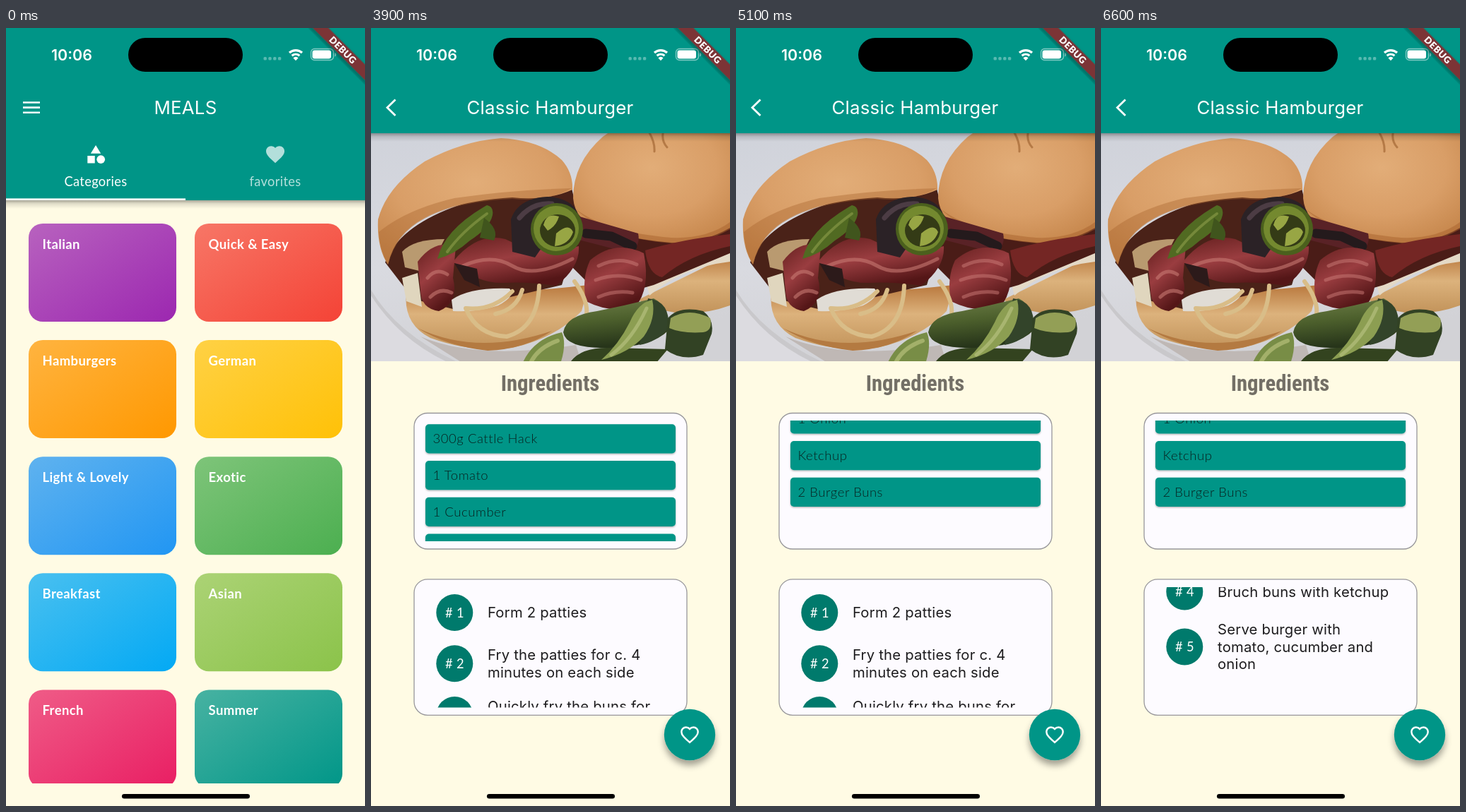
Recreate the animation shown at these times as an HTML page. Size 508x1102 px, loop 8 s.

```html
<!DOCTYPE html>
<html lang="en">
<head>
<meta charset="utf-8">
<title>Meals app</title>
<style>
html, body { margin: 0; width: 100%; height: 100%; overflow: hidden; background: #fffbe4; }
svg { display: block; width: 508px; height: 1102px; }
text { white-space: pre; }
.body { font: 400 18.3px Lato, sans-serif; letter-spacing: .35px; }
.item { font: 300 18.5px Lato, sans-serif; letter-spacing: .55px; }
.label { font: 700 18.5px Lato, sans-serif; letter-spacing: .4px; fill: #fff; }
.big { font: 400 31.5px Lato, sans-serif; letter-spacing: .75px; fill: #fff; }
.title { font: 400 25.8px Inter, sans-serif; letter-spacing: .22px; fill: #fff; }
.step { font: 400 20.3px Inter, sans-serif; letter-spacing: .2px; fill: #1d1c1e; }
.head { font: 700 30.7px "Roboto Condensed", Roboto, sans-serif; font-stretch: condensed; }
.clock { font: 600 21.5px Inter, sans-serif; fill: #fff; }
.debug { font: 900 13.2px Lato, sans-serif; letter-spacing: .5px; fill: #fff; }
.mid { text-anchor: middle; }
.line { fill: none; stroke-linecap: round; stroke-linejoin: round; }
</style>
</head>
<body>
<svg viewBox="0 0 508 1102">
  <defs>
    <linearGradient id="shade" x2="0" y2="1">
      <stop stop-color="#000" stop-opacity=".34"/>
      <stop offset=".4" stop-color="#000" stop-opacity=".12"/>
      <stop offset="1" stop-color="#000" stop-opacity="0"/>
    </linearGradient>
    <linearGradient id="edge">
      <stop stop-color="#000" stop-opacity="0"/>
      <stop offset="1" stop-color="#000" stop-opacity=".1"/>
    </linearGradient>
    <linearGradient id="wall" x2=".3" y2="1">
      <stop stop-color="#cfd2da"/><stop offset=".55" stop-color="#d9dae0"/><stop offset="1" stop-color="#d2d2d6"/>
    </linearGradient>
    <radialGradient id="bun" cx=".5" cy=".35" r=".75">
      <stop stop-color="#e2ad78"/><stop offset=".55" stop-color="#d99e67"/><stop offset="1" stop-color="#c48449"/>
    </radialGradient>
    <linearGradient id="crumb" x2="0" y2="1">
      <stop stop-color="#b9783d"/><stop offset=".45" stop-color="#dcb27c"/><stop offset="1" stop-color="#c2935a"/>
    </linearGradient>
    <linearGradient id="meat" x2=".5" y2="1">
      <stop stop-color="#65201f"/><stop offset=".5" stop-color="#9a3d40"/><stop offset="1" stop-color="#541617"/>
    </linearGradient>
    <linearGradient id="pickle" x2=".2" y2="1">
      <stop stop-color="#6f8048"/><stop offset=".5" stop-color="#4c5f2c"/><stop offset="1" stop-color="#27351a"/>
    </linearGradient>
    <filter id="soft" x="-30%" y="-30%" width="160%" height="160%">
      <feDropShadow dx="0" dy="3" stdDeviation="3" flood-opacity=".36"/>
    </filter>
    <filter id="lift" x="-50%" y="-50%" width="200%" height="200%">
      <feDropShadow dx="0" dy="7" stdDeviation="5" flood-opacity=".36"/>
    </filter>
    <filter id="thin" x="-5%" y="-20%" width="110%" height="150%">
      <feDropShadow dx="0" dy="1.2" stdDeviation=".9" flood-opacity=".32"/>
    </filter>
    <clipPath id="gridClip"><rect y="244" width="508" height="826"/></clipPath>
    <clipPath id="cardClip"><path d="M13 485V181a19 19 0 0 1 19-19H476a19 19 0 0 1 19 19V485z"/></clipPath>
    <clipPath id="photoClip"><rect y="149" width="508" height="323"/></clipPath>
    <clipPath id="itemClip"><rect x="70" y="556" width="368" height="171"/></clipPath>
    <clipPath id="stepClip"><rect x="70" y="792" width="368" height="170.5"/></clipPath>
    <path id="heart" d="M12 21.35l-1.45-1.32C5.4 15.36 2 12.28 2 8.5 2 5.42 4.42 3 7.5 3c1.74 0 3.41.81 4.5 2.09C13.09 3.81 14.76 3 16.5 3 19.58 3 22 5.42 22 8.5c0 3.78-3.4 6.86-8.55 11.54z"/>

    <!-- 3:2 picture, 8px taller at each end than the wide view shows -->
    <g id="photo">
      <rect y="-9" width="508" height="341" fill="url(#wall)"/>
      <path d="M0 222Q40 290 140 332H0z" fill="#c9c8cb"/>
      <path d="M0 230Q45 300 126 332H0z" fill="#dcdbe0"/>
      <path d="M70 288Q150 322 290 300L300 332H140z" fill="#bfb8b5"/>
      <!-- lower buns -->
      <path d="M50 225Q45 270 84 290 146 312 200 304 262 290 298 252L308 215Q180 230 50 225z" fill="url(#crumb)"/>
      <path d="M66 276Q150 316 256 280 218 306 165 308 108 302 66 276z" fill="#b47a41"/>
      <path d="M378 236L508 172V244Q470 258 430 254 400 250 378 236z" fill="url(#crumb)"/>
      <path d="M390 214L508 166V182Q440 190 394 230z" fill="#e4d9c6"/>
      <!-- inside -->
      <path d="M20 183Q40 130 130 100T284 78L296 130 270 215 120 250 60 235z" fill="#4a2218"/>
      <path d="M290 100L400 140 508 134V170L400 215 330 235 285 190z" fill="#4a1c17"/>
      <path d="M44 168Q60 150 104 150L80 198 48 190z" fill="#b99a70"/>
      <path d="M44 205L66 198 72 246 50 238z" fill="#e0d6be"/>
      <!-- top buns -->
      <path d="M24 186Q8 162 10 122 22 76 76 40 130 11 184 7 240 10 270 38 286 56 285 80 250 96 200 91 120 96 76 120 34 142 24 186z" fill="url(#bun)"/>
      <path d="M11 140Q50 108 118 92 200 80 284 78 250 98 200 93 120 97 76 121 36 142 24 186 12 165 11 140z" fill="#a9652f" opacity=".4"/>
      <path d="M286 92Q286 42 328 5L348 -9H508V134Q470 156 425 155 340 148 300 122 288 112 286 92z" fill="url(#bun)"/>
      <path d="M392 -4Q402 12 401 26M414 -4Q410 10 419 20" class="line" stroke="#b57a46" stroke-width="3"/>
      <path d="M288 106Q330 140 425 148 475 150 508 126V136Q470 158 425 156 330 148 288 106z" fill="#a9652f" opacity=".5"/>
      <!-- bacon -->
      <path d="M66 182Q90 150 120 160L116 205Q125 240 96 252 70 248 70 222z" fill="url(#meat)"/>
      <path d="M116 182Q150 140 190 150 240 175 294 160 296 190 262 216 220 210 190 212 150 214 116 182z" fill="url(#meat)"/>
      <path d="M130 188Q170 170 200 188T285 178M80 205Q92 190 108 200M84 232Q98 218 114 226" class="line" stroke="#c67872" stroke-width="5" opacity=".6"/>
      <path d="M198 122Q208 92 250 90 282 92 292 112L250 150 232 176 200 168z" fill="#2b2226"/>
      <path d="M210 120Q228 98 256 100" class="line" stroke="#4c3c44" stroke-width="7"/>
      <path d="M288 116Q330 128 378 142 382 160 366 170 330 160 290 150z" fill="#592226"/>
      <path d="M304 142L340 146 370 160" class="line" stroke="#241a1c" stroke-width="13"/>
      <path d="M310 180Q345 150 386 170 396 220 374 246 340 256 304 238 298 205 310 180z" fill="url(#meat)"/>
      <path d="M322 188Q350 174 376 186M318 208Q350 196 382 208M322 232Q345 222 370 226" class="line" stroke="#cb7c78" stroke-width="5" opacity=".5"/>
      <path d="M388 166Q440 150 508 143V160Q450 172 412 204 392 200 388 166z" fill="#742624"/>
      <path d="M118 184L150 192 154 218 132 208z" fill="#2c1a1a"/>
      <!-- onion -->
      <path d="M114 236Q140 218 196 220 206 230 180 244 150 254 116 252z" fill="#e0dcd5"/>
      <path d="M200 224Q172 252 134 248 150 286 192 288 236 276 238 216M214 222Q206 250 176 256M288 210Q310 240 304 262" class="line" stroke="#d9bd88" stroke-width="6"/>
      <!-- peppers -->
      <path d="M94 178Q104 136 164 102 174 104 172 116 168 134 140 152 118 172 94 178z" fill="#516a22"/>
      <path d="M108 168Q128 140 164 114" class="line" stroke="#75893a" stroke-width="4"/>
      <path d="M160 120Q182 136 174 152L154 148z" fill="#40551d"/>
      <circle cx="263" cy="136" r="37" fill="#4b601d"/>
      <circle cx="262" cy="135" r="32" fill="#74892f"/>
      <ellipse cx="264" cy="138" rx="25" ry="23" fill="#343b16"/>
      <path d="M244 130Q248 112 266 118 262 132 250 138zM262 142Q280 126 286 140 280 158 260 160z" fill="#98a644"/>
      <!-- gherkins -->
      <path d="M212 332Q226 292 270 282 278 300 266 332z" fill="#788d46"/>
      <path d="M226 325Q236 304 264 294" class="line" stroke="#a3b06a" stroke-width="6"/>
      <path d="M278 332Q290 302 340 304L420 306 398 332z" fill="#33431f"/>
      <path d="M272 282Q276 258 320 252 360 244 400 234 424 246 420 280 398 302 340 304 276 306 272 282z" fill="url(#pickle)"/>
      <path d="M392 234Q424 238 421 276 404 296 380 300z" fill="#33442a"/>
      <path d="M326 321Q350 300 366 268 378 240 398 236 404 262 386 288 364 312 326 321z" fill="#8c9e52"/>
      <path d="M340 314Q370 292 390 248" class="line" stroke="#a8b570" stroke-width="5"/>
      <path d="M420 262Q436 244 470 252 486 264 482 284L470 314Q440 324 416 306z" fill="#324224"/>
      <path d="M424 262Q450 246 480 262 484 280 470 282 440 284 422 276z" fill="#939f56"/>
    </g>
  </defs>

  <g id="meals"></g>
  <g id="recipes"></g>
  <g id="detail"></g>

  <g id="status">
    <text x="93" y="46" class="clock mid">10:06</text>
    <rect x="173" y="14" width="162" height="48" rx="24"/>
    <g fill="#fff" opacity=".35">
      <rect x="364.5" y="41" width="4.4" height="4.6" rx="1.5"/><rect x="371.3" y="41" width="4.4" height="4.6" rx="1.5"/>
      <rect x="378.1" y="41" width="4.4" height="4.6" rx="1.5"/><rect x="384.9" y="41" width="4.4" height="4.6" rx="1.5"/>
    </g>
    <path d="M401 35a13.5 13.5 0 0 1 18 0M404.6 39.2a8.4 8.4 0 0 1 10.8 0" fill="none" stroke="#fff" stroke-width="3.2"/>
    <path d="M410 46.2l-3.6-3.8a5 5 0 0 1 7.2 0z" fill="#fff"/>
    <rect x="431.5" y="29.5" width="32" height="16" rx="5" fill="none" stroke="#fff" stroke-opacity=".5" stroke-width="1.3"/>
    <rect x="433.5" y="31.5" width="26.5" height="12" rx="3.2" fill="#fff"/>
    <path d="M465.3 35v5.4q2-.6 2-2.7t-2-2.7z" fill="#fff" opacity=".5"/>
    <g transform="translate(508 0) rotate(45)">
      <rect x="-60" y="36.5" width="120" height="15.6" fill="#842d33" opacity=".94" filter="url(#soft)"/>
      <text x="0" y="49" class="debug mid">DEBUG</text>
    </g>
    <rect x="164" y="1085" width="181" height="6.6" rx="3.3"/>
  </g>
</svg>
<script>
const LOOP = 8000, TICK = 100, WIDTH = 508, TEAL = '#009587';
const $ = id => document.getElementById(id);
const text = (x, y, str, cls, extra = '') => `<text x="${x}" y="${y}" class="${cls}" ${extra}>${str}</text>`;
const icon = (x, y, inner, extra = '') => `<g transform="translate(${x} ${y}) scale(1.3026)" ${extra}>${inner}</g>`;

const page = '<rect x="-14" width="14" height="1102" fill="url(#edge)"/><rect width="508" height="1102" fill="#fffbe4"/>';
const bar = h => `<rect y="${h}" width="508" height="12" fill="url(#shade)"/><rect width="508" height="${h}" fill="${TEAL}"/>`;
const back = '<path d="M34.5 101.5L23 112.7 34.500 124" fill="none" stroke="#fff" stroke-width="2.8"/>';

// Category grid
const tiles = [
  ['Italian', '#9c27b0'], ['Quick &amp; Easy', '#f44336'],
  ['Hamburgers', '#ff9800'], ['German', '#ffc107'],
  ['Light &amp; Lovely', '#2196f3'], ['Exotic', '#4caf50'],
  ['Breakfast', '#03a9f4'], ['Asian', '#8bc34a'],
  ['French', '#e91e63'], ['Summer', '#009688']
];
const tile = ([name, color], i) => {
  const x = i % 2 ? 267 : 32, y = 277 + 165.1 * Math.floor(i / 2);
  return `<linearGradient id="tile${i}" x2="1" y2="1"><stop stop-color="${color}" stop-opacity=".72"/>
    <stop offset="1" stop-color="${color}"/></linearGradient>
    <rect x="${x}" y="${y}" width="209" height="139" rx="20" fill="url(#tile${i})"/>` +
    text(x + 19.5, y + 36, name, 'label');
};
$('meals').innerHTML = page + `<g clip-path="url(#gridClip)">${tiles.map(tile).join('')}</g>` + bar(244) +
  '<path d="M24 105.5H48M24 112.6H48M24 119.7H48" stroke="#fff" stroke-width="2.6"/>' +
  text(254, 122, 'MEALS', 'title mid') +
  icon(111.4, 163.4, '<path d="M12 2L6.5 11h11zM3 13.5h8v8H3z"/><circle cx="17.5" cy="17.5" r="4.5"/>', 'fill="#fff"') +
  icon(365.4, 163.4, '<use href="#heart"/>', 'fill="#fff" opacity=".7"') +
  text(127, 224, 'Categories', 'body mid', 'fill="#fff"') +
  text(381, 224, 'favorites', 'body mid', 'fill="#fff" opacity=".7"') +
  '<rect y="241.4" width="254" height="2.6" fill="#fff"/>';

// Recipe card
$('recipes').innerHTML = page + bar(149) + back +
  text(253.5, 123, 'Recipes', 'head mid', 'fill="#fff"') +
  `<rect x="13" y="162" width="482" height="406" rx="19" fill="#fdfbff" filter="url(#soft)"/>
  <g clip-path="url(#cardClip)">
    <use href="#photo" transform="translate(254 323.5) scale(.951) translate(-254 -161.5)"/>
  </g>
  <rect x="159" y="397" width="323" height="62" rx="13" fill="#000" opacity=".56"/>` +
  text(172, 440, 'Classic Hamburger', 'big') +
  icon(60.4, 510.6, '<circle cx="12" cy="12" r="9"/><path d="M11.8 7v5.4l4.3 2.6"/>', 'fill="none" stroke="#1b1b1d" stroke-width="1.9"') +
  icon(201.2, 511, '<path fill-rule="evenodd" d="M20 6h-4V4q0-2-2-2h-4q-2 0-2 2v2H4q-2 0-2 2v11q0 2 2 2h16q2 0 2-2V8q0-2-2-2zM14 6h-4V4h4z"/>', 'fill="#1b1b1d"') +
  icon(348.4, 510.6, '<path d="M15.1 9c0-2-1.4-3-3.6-3S7.8 7 7.8 8.8C7.8 13 15.3 11 15.3 15.3c0 1.9-1.4 2.8-3.8 2.8s-3.9-1.2-4-3.2M11.5 3v3M11.5 18v3"/>', 'fill="none" stroke="#1b1b1d" stroke-width="2.3"') +
  [[102, '45 min'], [242, 'Simple'], [391, 'Pricey']].map(([x, s]) => text(x, 533, s, 'body', 'fill="#2b4645"')).join('');

// Recipe detail
const items = ['300g Cattle Hack', '1 Tomato', '1 Cucumber', '1 Onion', 'Ketchup', '2 Burger Buns'];
const item = (name, i) => {
  const y = 561.2 + 51.75 * i;
  return `<rect x="77" y="${y}" width="354" height="41.3" rx="5" fill="${TEAL}" filter="url(#thin)"/>` +
    text(87.5, y + 27, name, 'item', 'fill="#08211f"');
};
const steps = [
  [828, 'Form 2 patties'],
  [900.3, 'Fry the patties for c. 4', 'minutes on each side'],
  [973, 'Quickly fry the buns for', 'c. 1 minute on each side'],
  [1045.7, 'Bruch buns with ketchup'],
  [1123.7, 'Serve burger with', 'tomato, cucumber and', 'onion']
];
const step = ([y, ...lines], i) => `<circle cx="118.3" cy="${y}" r="26" fill="#007a6c"/>` +
  text(118.5, y + 6.7, '# ' + (i + 1), 'body mid', 'fill="#fff"') +
  lines.map((s, n) => text(165, y + 7.2 + 24.4 * (n - (lines.length - 1) / 2), s, 'step')).join('');
const box = y => `<rect x="61" y="${y}" width="386" height="192.5" rx="19" fill="#fdfbff" stroke="#97969a" stroke-width="1.3"/>`;

$('detail').innerHTML = page +
  '<g clip-path="url(#photoClip)"><use href="#photo" y="149"/></g>' + bar(149) + back +
  text(253.5, 121.5, 'Classic Hamburger', 'title mid') +
  text(253.5, 513.5, 'Ingredients', 'head mid', 'fill="#736f66"') +
  box(545.5) + `<g clip-path="url(#itemClip)"><g id="items">${items.map(item).join('')}</g></g>` +
  box(780.8) + `<g clip-path="url(#stepClip)"><g id="steps">${steps.map(step).join('')}</g></g>` +
  `<circle cx="451" cy="1001" r="36.2" fill="${TEAL}" filter="url(#lift)"/>
  <use href="#heart" transform="translate(451 1001) scale(1.17) translate(-12 -12)" fill="none" stroke="#fff" stroke-width="2.1"/>`;

// Each track: start time, then one value per tick
const tracks = {
  open: [100, .48, .93, 1],
  push: [1100, .48, .93, 1],
  items: [4100, 18, 62, 118, 165, 188, 191, 187.4, 185.3, 184.2, 183.6, 183.2],
  steps: [5600, 45, 118, 187.7, 236, 256, 258, 254.5, 251.5, 249.3, 248, 247.3]
};
const at = (name, t) => {
  const [start, ...values] = tracks[name];
  const n = Math.floor((t - start) / TICK);
  return n < 0 ? 0 : values[Math.min(n, values.length - 1)];
};
const move = (id, x, y = 0) => $(id).setAttribute('transform', `translate(${x} ${y})`);
const show = (id, on) => $(id).setAttribute('visibility', on ? 'visible' : 'hidden');

const begin = performance.now();
function draw() {
  const t = Math.max(0, performance.now() - begin) % LOOP;
  const open = at('open', t), push = at('push', t);
  move('meals', -open * WIDTH / 3);
  move('recipes', (1 - open) * WIDTH - push * WIDTH / 3);
  move('detail', (1 - push) * WIDTH);
  show('meals', open < 1);
  show('recipes', open > 0 && push < 1);
  show('detail', push > 0);
  move('items', 0, -at('items', t));
  move('steps', 0, -at('steps', t));
  requestAnimationFrame(draw);
}
draw();
</script>
</body>
</html>
```
